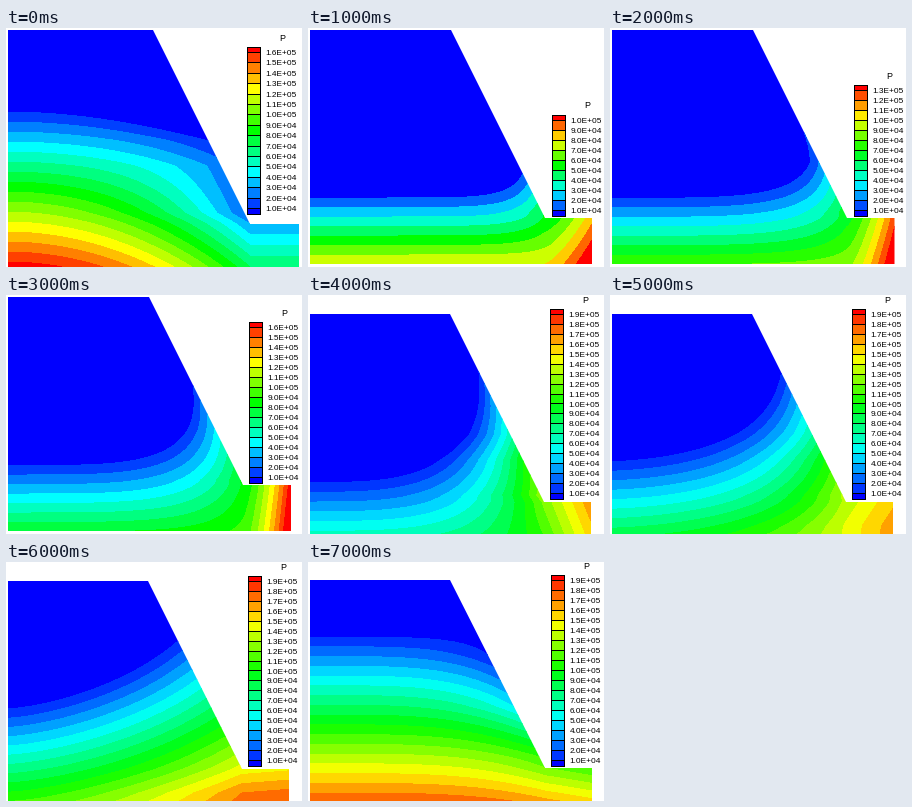
Animation of 296x239 px, one loop 8000 ms. Source, as a matplotlib script:

```python
import numpy as np
import matplotlib.pyplot as plt
from matplotlib.animation import FuncAnimation
from matplotlib.patches import Polygon, Rectangle

W, H = 296, 239
X, Y = np.meshgrid(np.arange(W + 1.0), np.arange(H + 1.0))

plt.rcParams["font.family"] = "Liberation Sans"
fig = plt.figure(figsize=(W / 72, H / 72), dpi=72, facecolor="white")
ax = fig.add_axes([0, 0, 1, 1])


def rainbow(t):
    """Blue, cyan, green, yellow, red."""
    stops = [0, 0.25, 0.5, 0.75, 1]
    return (np.interp(t, stops, [0, 0, 0, 1, 1]),
            np.interp(t, stops, [0, 1, 1, 1, 0]),
            np.interp(t, stops, [1, 1, 0, 0, 0]))


def pressure(shape, start, step, slope, power, shelf=0.0, shelf_power=1.0):
    """Pressure in contour steps.

    Down the left side it grows by 1 every `step` pixels, reaching 1 at `start`.
    Down the sloping face it follows the (y, value) pairs in `slope`.
    Each row eases from left to face; `shelf` adds a rise beyond the foot.
    """
    top, crest, foot_x, foot_y, right, _ = shape
    face_x = np.minimum(crest + (Y - top) * (foot_x - crest) / (foot_y - top), foot_x)
    left = 1 + (Y - start) / step
    face = np.interp(Y, *zip(*slope))
    ease = np.clip(X / face_x, 0, 1) ** power
    beyond = np.clip((X - foot_x) / (right - foot_x), 0, 1) ** shelf_power
    return left + (face - left) * ease + shelf * beyond


def scene(count, shape, legend, **flow):
    """shape: top, crest x, foot x, foot y, right, bottom; legend: left, top, bottom."""
    return dict(count=count, shape=np.array(shape, float),
                legend=np.array(legend, float), field=pressure(shape, **flow))


def between(a, b):
    """Halfway state of two scenes."""
    mid = {key: (a[key] + b[key]) / 2 for key in a}
    mid["count"] = int(mid["count"])
    return mid


settled = scene(
    16, (2, 147, 244, 196, 293, 239), (241, 19, 186), start=84, step=10, power=2,
    slope=[(84, -1.9), (113, 1), (138, 2.5), (185, 2), (196, 3), (239, 7)])

onset = scene(
    10, (2, 143, 237, 190, 284, 236), (244, 87, 188), start=170, step=9.5, power=9,
    slope=[(136, 0), (184, 4.9), (190, 5.1), (236, 8)], shelf=3.5, shelf_power=1.4)

rising = scene(
    16, (2, 143, 237, 190, 285, 236), (243, 27, 188), start=170.5, step=9.5, power=4.3,
    slope=[(80, 0.5), (90, 1), (133, 4), (185, 8), (236, 9.3)], shelf=8.5, shelf_power=1.4)

strong_shape, strong_legend = (19, 142, 236, 207, 283, 239), (242, 14, 204)

strong = scene(
    19, strong_shape, strong_legend, start=187.5, step=9.75, power=3.3,
    slope=[(65, 0), (112, 4), (140, 6.5), (165, 10), (200, 12.5), (239, 11)], shelf=4.5)

spreading = scene(
    19, strong_shape, strong_legend, start=147, step=9.25, power=1.5,
    slope=[(19, -5.3), (207, 14.4), (231, 17), (239, 17.4)], shelf=0.4)

layered = scene(
    19, (18, 142, 237, 206, 284, 239), (243, 13, 204), start=75, step=9.75, power=4,
    slope=[(75, 0.3), (93, 1), (145, 5), (195, 11), (206, 12), (239, 16.3)], shelf=-1)

scenes = [settled, onset, between(onset, rising), rising,
          strong, between(strong, spreading), spreading, layered]


def block(x0, y0, x1, y1, color):
    ax.add_patch(Rectangle((x0, y0), x1 - x0, y1 - y0, fc=color, lw=0, aa=False))


def draw_field(sc, colors):
    top, crest, foot_x, foot_y, right, bottom = sc["shape"]
    outline = Polygon([(2, top), (crest, top), (foot_x, foot_y), (right, foot_y),
                       (right, bottom), (2, bottom)], fc="none", lw=0)
    ax.add_patch(outline)
    bands = ax.contourf(X, Y, sc["field"], levels=np.arange(1, sc["count"] + 1),
                        colors=colors, extend="both", antialiased=False)
    bands.set_clip_path(outline)


def draw_legend(sc, colors):
    n = sc["count"]
    left, top, bottom = sc["legend"]
    left = round(left)
    marks = np.linspace(top + 6, bottom - 5, n)
    lines = np.round(np.r_[top, marks - 1, bottom]).astype(int)
    block(left, lines[0], left + 14, lines[-1] + 1, "black")
    for color, y0, y1 in zip(colors[::-1], lines, lines[1:]):
        block(left + 1, y0 + 1, left + 13, y1, color)
    for i, y in enumerate(marks):
        ax.text(left + 18.7, y + 0.5, f"{(n - i) * 1e4:.1E}", size=8.2, va="center")
    ax.text(left + 35, top - 9, "P", size=9, va="center", ha="center")


def draw(i):
    sc = scenes[i]
    colors = [rainbow(k / sc["count"]) for k in range(sc["count"] + 1)]
    ax.clear()
    draw_field(sc, colors)
    draw_legend(sc, colors)
    ax.set_xlim(0, W)
    ax.set_ylim(H, 0)
    ax.set_axis_off()
    return []


anim = FuncAnimation(fig, draw, frames=len(scenes), interval=1000, repeat=True,
                     init_func=lambda: draw(0))
plt.show()
```
